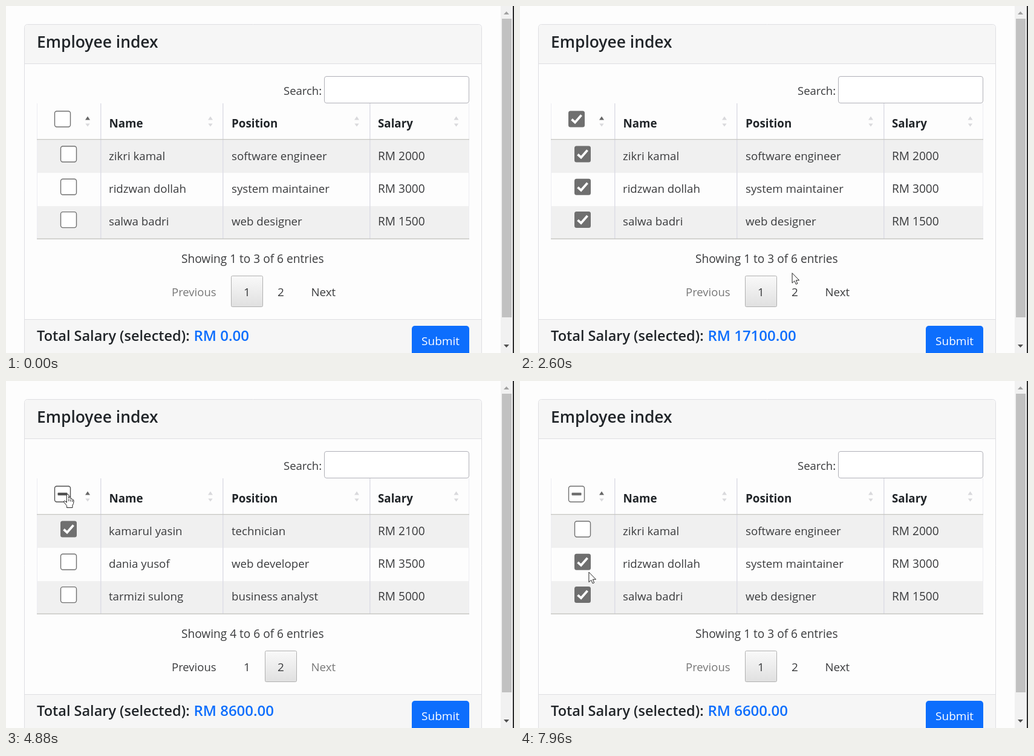
Animation, 840 px wide and 574 px high, one loop 8000 ms. Source, as an HTML page with a canvas:

```html
<!DOCTYPE html>
<html lang="en">
<head>
<meta charset="utf-8">
<title>Employee index</title>
<style>
html, body { margin: 0; width: 100%; height: 100%; overflow: hidden; background: #fdfdfd; }
canvas { display: block; width: 840px; height: 574px; }
</style>
</head>
<body>
<canvas id="stage" width="840" height="574"></canvas>
<script>
const ctx = document.getElementById('stage').getContext('2d');
const LOOP = 8000, STAY = 300, PRESS = 200;
const BG = '#fdfdfd', PANEL = '#f6f6f6', STRIPE = '#f0f0f0';
const EDGE = '#dedee2', RULE = '#c9c9c5', TEXT = '#3a3b3d', DARK = '#212529';
const MUTED = '#777777', BLUE = '#0d6efd', ICON = '#d9d9dc', INK = '#6f6f6f';
const ROW = 54.3;

const staff = [
  ['zikri kamal', 'software engineer', 2000],
  ['ridzwan dollah', 'system maintainer', 3000],
  ['salwa badri', 'web designer', 1500],
  ['kamarul yasin', 'technician', 2100],
  ['dania yusof', 'web developer', 3500],
  ['tarmizi sulong', 'business analyst', 5000]
];

const box = (x, y, w, h) => ({ x, y, w, h });
const headBox = box(80.5, 174, 26, 26);
const rowBoxes = [0, 1, 2].map(i => box(90.5, 232 + i * ROW, 26, 26));
const pageBoxes = [0, 1].map(i => box(372.5 + i * 56, 446.5, 52, 51));
const outside = box(-30, 330, 0, 0);

// Each visit: arrival time, box, place inside it as fractions, what the click does
const visit = (at, b, u, v, act) => ({ at, x: b.x + b.w * u, y: b.y + b.h * v, act });
const uncheck = n => s => { s.on[n] = false; };
const turnTo = n => s => { s.page = n; };
const visits = [
  visit(0, outside, 0, 0),
  visit(1200, headBox, .7, .55, s => s.on.fill(true)),
  visit(2820, pageBoxes[1], .95, .3, turnTo(1)),
  visit(3620, rowBoxes[1], .75, .98, uncheck(4)),
  visit(4250, rowBoxes[2], .75, .6, uncheck(5)),
  visit(4800, headBox, .83, .5),
  visit(5750, pageBoxes[0], .9, .46, turnTo(0)),
  visit(6950, rowBoxes[0], .7, .7, uncheck(0)),
  visit(7940, rowBoxes[1], .9, 1.15)
];

function stateAt(t) {
  const s = { page: 0, on: staff.map(() => false) };
  visits.forEach(v => { if (v.act && t >= v.at + PRESS) v.act(s); });
  return s;
}

function pointerAt(t) {
  const i = visits.findIndex(v => v.at > t);
  if (i < 0) return visits.at(-1);
  const a = visits[i - 1], b = visits[i];
  const u = Math.max(0, (t - a.at - STAY) / (b.at - a.at - STAY));
  const k = u * u * (3 - 2 * u);
  return { x: a.x + (b.x - a.x) * k, y: a.y + (b.y - a.y) * k };
}

const inside = (p, b) => p.x >= b.x && p.x <= b.x + b.w && p.y >= b.y && p.y <= b.y + b.h;

function rect(x, y, w, h, color) {
  ctx.fillStyle = color;
  ctx.fillRect(x, y, w, h);
}

function round(x, y, w, h, r, fill, stroke, line = 1) {
  ctx.beginPath();
  ctx.roundRect(x, y, w, h, r);
  if (fill) { ctx.fillStyle = fill; ctx.fill(); }
  if (stroke) { ctx.strokeStyle = stroke; ctx.lineWidth = line; ctx.stroke(); }
}

function text(str, x, y, size = 18.7, color = TEXT, weight = 400, align = 'left') {
  ctx.font = `${weight} ${size}px "Open Sans", "Noto Sans", sans-serif`;
  ctx.textAlign = align;
  ctx.fillStyle = color;
  ctx.fillText(str, x, y);
}

// Triangle with its apex at (x, y); a negative height points down
function triangle(x, y, half, height, color) {
  ctx.beginPath();
  ctx.moveTo(x, y);
  ctx.lineTo(x + half, y + height);
  ctx.lineTo(x - half, y + height);
  ctx.fillStyle = color;
  ctx.fill();
}

function checkbox(b, mark, hover) {
  const ink = hover ? '#4f4f4f' : INK;
  if (mark === 'check') {
    round(b.x - .5, b.y - .5, b.w + 1, b.h + 1, 3.5, ink);
    ctx.beginPath();
    ctx.moveTo(b.x + 5, b.y + 13.5);
    ctx.lineTo(b.x + 10.5, b.y + 18.5);
    ctx.lineTo(b.x + 21, b.y + 6.5);
    ctx.strokeStyle = '#fff';
    ctx.lineWidth = 3.8;
    ctx.stroke();
    return;
  }
  round(b.x, b.y, b.w, b.h, 3.5, '#fff', ink, 1.4);
  if (mark === 'dash') round(b.x + 5, b.y + 10.8, 16, 4.4, 1, ink);
}

function card() {
  round(30.5, 30.5, 756, 600, 5, BG, EDGE);
  round(31, 31, 755, 64, [4.5, 4.5, 0, 0], PANEL);
  rect(31, 95, 755, 1, EDGE);
  rect(31, 518, 755, 1, EDGE);
  rect(31, 519, 755, 55, PANEL);
  text('Employee index', 51, 69, 26.4, DARK, 600);
  text('Search:', 459, 147, 18.5);
  round(526.5, 116.5, 239, 44, 3.5, '#fff', '#b0b0b8');
}

function table(s, p) {
  rect(51, 222, 715, 54, STRIPE);
  rect(51, 331, 715, 54, STRIPE);
  [51, 765].forEach(x => rect(x, 161, 1, 224, '#ececf2'));
  [156, 358, 601].forEach(x => rect(x, 161, 1.5, 224, '#dddde6'));
  rect(51, 220, 715, 1.5, RULE);
  rect(51, 384.5, 715, 1.5, RULE);

  [['Name', 170.5], ['Position', 373], ['Salary', 615]].forEach(([label, x]) =>
    text(label, x, 201, 18.75, DARK, 700));
  [135, 338, 580, 744.5].forEach((x, i) => {
    triangle(x, 182.5, 4, 6, i ? ICON : '#666');
    triangle(x, 199.5, 3.7, -5, ICON);
  });

  const count = s.on.filter(Boolean).length;
  const mark = count === staff.length ? 'check' : count ? 'dash' : '';
  checkbox(headBox, mark, inside(p, headBox));

  rowBoxes.forEach((b, i) => {
    const n = s.page * 3 + i;
    const [name, job, pay] = staff[n];
    const y = 254.5 + i * ROW;
    checkbox(b, s.on[n] ? 'check' : '', inside(p, b));
    text(name, 170, y);
    text(job, 373, y);
    text('RM ' + pay, 615, y, 19.1);
  });
}

function gradient(b, top, bottom) {
  const g = ctx.createLinearGradient(0, b.y, 0, b.y + b.h);
  g.addColorStop(0, top);
  g.addColorStop(1, bottom);
  return g;
}

function pager(s, p) {
  const from = s.page * 3 + 1;
  text(`Showing ${from} to ${from + 2} of 6 entries`, 290, 424.5, 19.1);
  text('Previous', 274, 480, 18.5, s.page ? TEXT : MUTED);
  text('Next', 504.5, 480, 18.7, s.page ? MUTED : TEXT);
  pageBoxes.forEach((b, i) => {
    const current = s.page === i, hover = !current && inside(p, b);
    if (current) round(b.x, b.y, b.w, b.h, 2, gradient(b, '#f9f9f9', '#e0e0e0'), '#b0b0b0');
    if (hover) round(b.x, b.y, b.w, b.h, 2, gradient(b, '#585858', '#111'), '#111');
    text(i + 1, b.x + b.w / 2, 480, 19, hover ? '#fff' : TEXT, 400, 'center');
  });
}

function footer(s) {
  const total = staff.reduce((sum, row, i) => sum + (s.on[i] ? row[2] : 0), 0);
  text('Total Salary (selected):', 51, 554, 23.5, DARK, 600);
  text('RM ' + total.toFixed(2), 310.5, 554, 24, BLUE, 600);
  round(671, 529, 95, 60, 5, BLUE);
  text('Submit', 718.5, 561, 19, '#fff', 400, 'center');
}

function scrollbar() {
  rect(818, 0, 20, 574, '#f1f1f1');
  rect(820, 21, 16, 494, '#c1c1c1');
  triangle(827.5, 9, 4.5, 5, '#a0a0a0');
  triangle(827.5, 565, 4.5, -5, '#505050');
  rect(838, 0, 2, 574, '#2c2c2c');
}

const arrow = new Path2D('M0 0V16.5L3.8 13L6.3 18.6L8.8 17.5L6.4 12H11.6Z');
const hand = new Path2D('M-1.8 14V1.5Q0-1 1.8 1.5V7Q4-.2 5 8Q7 6.8 8 9.2Q10 9 10 11.5' +
  'Q10 16 7.8 19V22.5H-1.5V19.5L-6.5 13Q-6.5 10-4 12Z');
const creases = new Path2D('M1.8 8V12M4.9 9V12.5M7.9 10V13');

function pointer(p) {
  const over = [headBox, ...rowBoxes, ...pageBoxes].some(b => inside(p, b));
  const path = over ? hand : arrow;
  ctx.save();
  ctx.translate(p.x, p.y);
  ctx.lineJoin = 'round';
  ctx.lineWidth = 1;
  ctx.fillStyle = '#fff';
  ctx.strokeStyle = '#222';
  ctx.fill(path);
  ctx.stroke(path);
  if (over) ctx.stroke(creases);
  ctx.restore();
}

function draw(t) {
  const s = stateAt(t), p = pointerAt(t);
  rect(0, 0, 840, 574, BG);
  card();
  table(s, p);
  pager(s, p);
  footer(s);
  scrollbar();
  pointer(p);
}

const start = performance.now();
function tick() {
  draw((performance.now() - start) % LOOP);
  requestAnimationFrame(tick);
}
tick();
</script>
</body>
</html>
```
